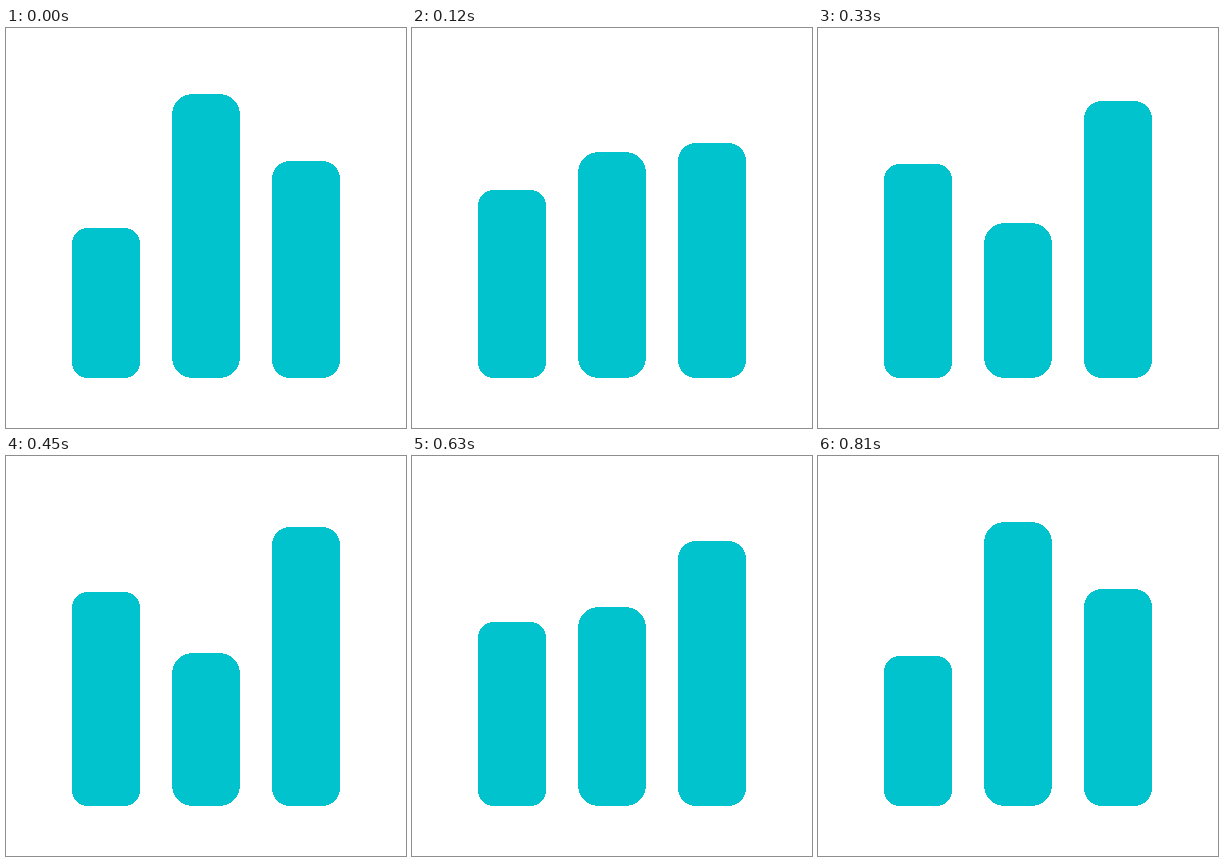
Recreate the animation shown at these times as an HTML page. Size 400x400 px, loop 1.23 s.

```html
<!DOCTYPE html>
<html lang="en">
<head>
<meta charset="utf-8">
<title>Bar chart</title>
<style>
  html, body { margin: 0; width: 100%; height: 100%; overflow: hidden; background: #fff; }
  svg { display: block; width: 100%; height: 100%; }
</style>
</head>
<body>
<svg id="stage" viewBox="0 0 400 400" fill="#00c3ce" shape-rendering="crispEdges"></svg>
<script>
const LOOP = 1230, STEP = 30, MOVE = 810;
const LEFT = 66, PITCH = 100, WIDTH = 68, BASE = 350;

// Top edge at rest and at full swing, corner radius
const bars = [
  { rest: 200, swing: 135.5, r: 16 },
  { rest: 66, swing: 197, r: 21 },
  { rest: 133, swing: 70.5, r: 18 }
];

const stage = document.getElementById("stage");
bars.forEach((bar, i) => {
  bar.el = document.createElementNS("http://www.w3.org/2000/svg", "rect");
  const attrs = { x: LEFT + i * PITCH, width: WIDTH, rx: bar.r, ry: bar.r };
  for (const name in attrs) bar.el.setAttribute(name, attrs[name]);
  stage.append(bar.el);
});

const clamp = v => Math.min(1, Math.max(0, v));
const smooth = s => s * s * (3 - 2 * s);

// Quick start with a long soft landing, then an even ease back
const rise = t => 1 - Math.exp(-((Math.max(0, t + 38) / 167) ** 2));
const fall = t => smooth(clamp((t - 465) / 340));

function draw(now) {
  const t = Math.floor((now % LOOP) / STEP) * STEP;
  const moving = t > 0 && t < MOVE;
  bars.forEach(({ el, rest, swing }, i) => {
    const local = t - i * STEP; // each bar trails its neighbour by one step
    const amount = moving ? rise(local) * (1 - fall(local)) : 0;
    const y = Math.round(rest + (swing - rest) * amount);
    el.setAttribute("y", y);
    el.setAttribute("height", BASE - y);
  });
}

const start = performance.now();
function tick() {
  draw(performance.now() - start);
  requestAnimationFrame(tick);
}
tick();
</script>
</body>
</html>
```
